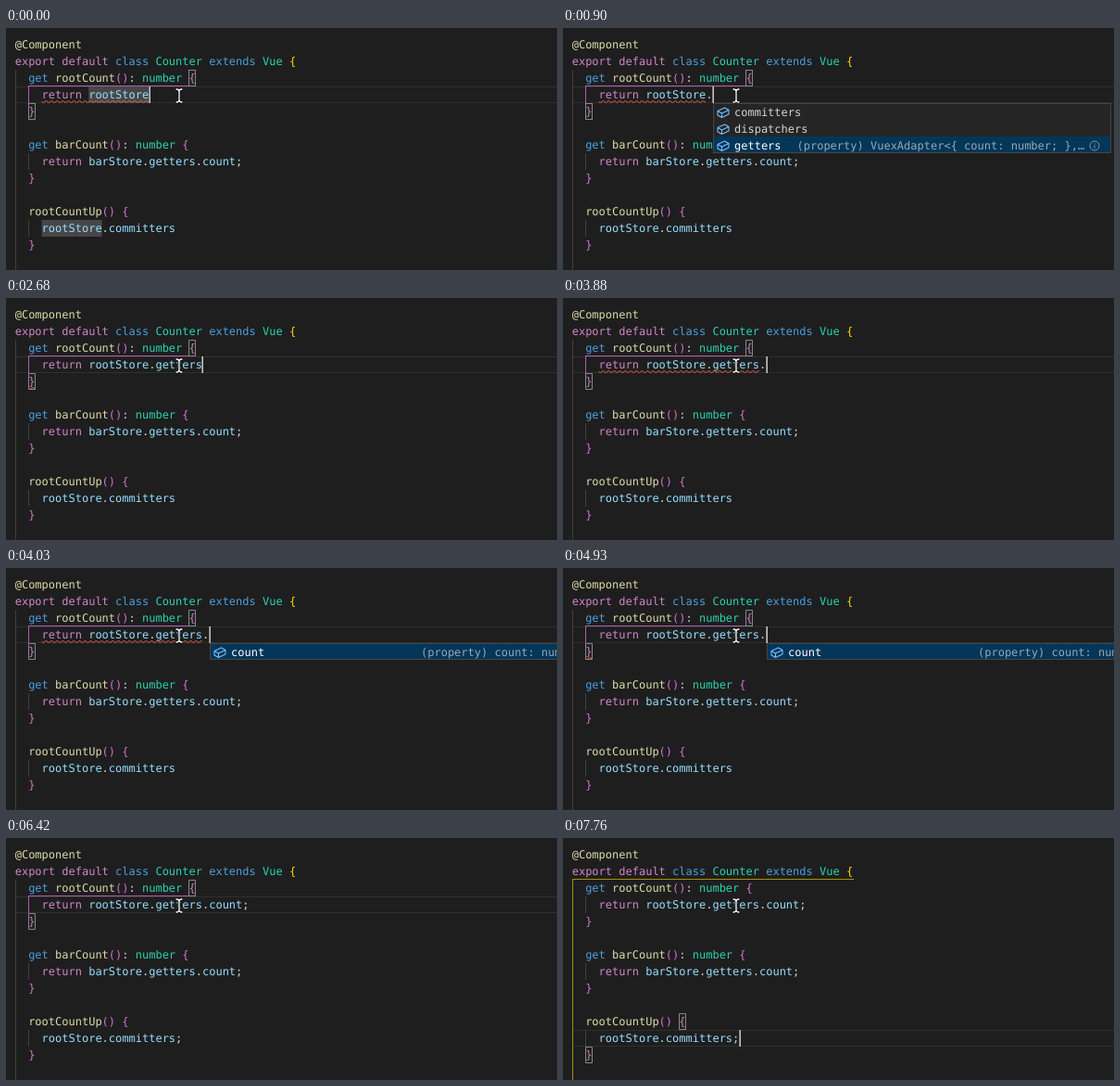
An HTML page with a canvas that plays this animation: 595 by 261 pixels, repeating every 8 s.

```html
<!DOCTYPE html>
<html lang="en">
<head>
<meta charset="utf-8">
<title>Editor completion</title>
<style>
  html, body { margin: 0; width: 100%; height: 100%; overflow: hidden; background: #1e1e1e; }
  canvas { display: block; width: 595px; height: 261px; }
</style>
</head>
<body>
<canvas id="stage" width="595" height="261"></canvas>
<script>
const LOOP = 8000;
const WIDTH = 595, HEIGHT = 261;
const LEFT = 9.7, CHAR = 7.224, TOP = 9, LINE = 18;
const FONT = '12px "DejaVu Sans Mono", monospace';

const C = {
  bg: '#1e1e1e', plain: '#d4d4d4', variable: '#96deff', func: '#dcdcaa',
  control: '#d385cb', keyword: '#4a9fe0', type: '#2ad3ae',
  gold: '#ffd700', pink: '#da70d6', guide: '#404040', error: '#f1604c',
  goldGuide: '#a88f0c', pinkGuide: '#b05cad'
};

const wordColor = {};
const assign = (color, words) => words.split(' ').forEach(w => wordColor[w] = color);
assign(C.control, 'export default return');
assign(C.keyword, 'class extends get');
assign(C.type, 'Counter Vue number');
assign(C.func, '@Component rootCount barCount rootCountUp');

const canvas = document.getElementById('stage');
const ctx = canvas.getContext('2d');

const colX = col => LEFT + col * CHAR;
const rowY = row => TOP + row * LINE;

function rect(x, y, w, h, color) {
  ctx.fillStyle = color;
  ctx.fillRect(x, y, w, h);
}

function text(str, x, y, color) {
  ctx.fillStyle = color;
  ctx.fillText(str, x, y);
}

// Value of the last [time, value] step reached
function at(steps, t) {
  let value = steps[0][1];
  for (const [time, v] of steps) if (t >= time) value = v;
  return value;
}

const typed = [
  [0, 'rootStore'], [900, 'rootStore.'], [2680, 'rootStore.getters'],
  [3880, 'rootStore.getters.'], [5080, 'rootStore.getters.count'],
  [5970, 'rootStore.getters.count;']
];

const caretOn = [
  [0, true], [150, false], [600, true], [1340, false], [1790, true],
  [2390, false], [2680, true], [3130, false], [3730, true], [4480, false],
  [4930, true], [5530, false], [5970, true], [6420, false], [7020, true]
];

const caretRow = [[0, 3], [7310, 4], [7610, 13], [7760, 11]];

// Error range as [row, first column, last column]
const errorRange = [
  [0, [3, 4, 20]], [1200, [4, 2, 3]], [2980, [3, 4, 28]],
  [4330, [4, 2, 3]], [5680, null]
];

// Matched brackets as [row, column]
const bracketPair = [
  [0, [[2, 26], [4, 2]]], [7610, []], [7760, [[10, 16], [12, 2]]]
];

const memberList = {
  x: 162, selected: 2, items: ['committers', 'dispatchers', 'getters'],
  detail: '(property) VuexAdapter<{ count: number; },…', detailX: 90.5
};
const countList = {
  x: 220, selected: 0, items: ['count'],
  detail: '(property) count: number', detailX: 228
};
const popup = [[0, null], [900, memberList], [2680, null], [4030, countList], [5080, null]];

function codeLines(t) {
  return [
    '@Component',
    'export default class Counter extends Vue {',
    '  get rootCount(): number {',
    '    return ' + at(typed, t),
    '  }',
    '',
    '  get barCount(): number {',
    '    return barStore.getters.count;',
    '  }',
    '',
    '  rootCountUp() {',
    '    rootStore.committers' + (t >= 5970 ? ';' : ''),
    '  }',
    ''
  ];
}

function drawLine(line, row) {
  for (const { 0: token, index } of line.matchAll(/@?\w+|\S/g)) {
    let color = C.plain;
    if (/\w/.test(token)) color = wordColor[token] || C.variable;
    else if (/[(){}]/.test(token)) color = row === 1 ? C.gold : C.pink;
    text(token, colX(index), rowY(row) + 13, color);
  }
}

function drawGuides(inMethod) {
  rect(10, 45, 1, HEIGHT - 45, C.guide);
  for (const row of [3, 7, 11]) rect(24, rowY(row), 1, LINE, C.guide);
  if (inMethod) {
    rect(24, 62, 181, 1, C.pinkGuide);
    rect(24, 62, 1, 19, C.pinkGuide);
  } else {
    rect(10, 44, 304, 1, C.goldGuide);
    rect(10, 44, 1, HEIGHT - 44, C.goldGuide);
  }
}

function drawSquiggle([row, from, to]) {
  const x = colX(from), end = colX(to), y = rowY(row) + 15;
  ctx.save();
  ctx.beginPath();
  ctx.rect(x, y, end - x, 3);
  ctx.clip();
  ctx.beginPath();
  for (let px = x - 1.25; px < end + 6; px += 6) {
    ctx.lineTo(px, y + 0.3);
    ctx.lineTo(px + 3, y + 2.7);
  }
  ctx.strokeStyle = C.error;
  ctx.lineWidth = 1;
  ctx.stroke();
  ctx.restore();
}

function drawBracketBox([row, col]) {
  const x = Math.floor(colX(col)), y = rowY(row);
  rect(x, y, 8, LINE, 'rgba(0,100,0,0.1)');
  ctx.strokeStyle = '#888';
  ctx.lineWidth = 1;
  ctx.strokeRect(x + 0.5, y + 0.5, 7, LINE - 1);
}

function drawCube(cx, cy) {
  ctx.strokeStyle = '#75beff';
  ctx.lineWidth = 1.1;
  ctx.lineJoin = 'round';
  ctx.beginPath();
  ctx.moveTo(cx - 6, cy - 1.5);
  ctx.lineTo(cx + 1.5, cy - 5);
  ctx.lineTo(cx + 6, cy - 2.5);
  ctx.lineTo(cx + 6, cy + 2);
  ctx.lineTo(cx - 1.5, cy + 5.5);
  ctx.lineTo(cx - 6, cy + 3);
  ctx.closePath();
  ctx.moveTo(cx - 6, cy - 1.5);
  ctx.lineTo(cx - 1.5, cy + 1);
  ctx.lineTo(cx + 6, cy - 2.5);
  ctx.moveTo(cx - 1.5, cy + 1);
  ctx.lineTo(cx - 1.5, cy + 5.5);
  ctx.stroke();
}

function drawInfo(cx, cy) {
  ctx.strokeStyle = '#7f95a6';
  ctx.lineWidth = 1;
  ctx.beginPath();
  ctx.arc(cx, cy, 5, 0, Math.PI * 2);
  ctx.stroke();
  rect(cx - 0.5, cy - 2.8, 1, 1.2, '#7f95a6');
  rect(cx - 0.5, cy - 0.8, 1, 3.6, '#7f95a6');
}

function drawPopup({ x, selected, items, detail, detailX }) {
  const y = rowY(4), w = 430, h = items.length * LINE;
  rect(x, y, w, h, '#252526');
  rect(x, y + selected * LINE, w, LINE, '#033659');
  ctx.strokeStyle = '#454545';
  ctx.lineWidth = 1;
  ctx.strokeRect(x + 0.5, y + 0.5, w - 1, h - 1);
  items.forEach((item, i) => {
    const top = y + i * LINE;
    drawCube(x + 11, top + 10);
    text(item, x + 23, top + 14, i === selected ? '#ffffff' : C.plain);
  });
  const top = y + selected * LINE;
  text(detail, x + detailX, top + 14, '#94a9b8');
  drawInfo(x + 412, top + 10);
}

function drawPointer() {
  const x = 187, y = 66, bottom = 80;
  ctx.beginPath();
  ctx.moveTo(x - 3, y);
  ctx.quadraticCurveTo(x, y, x, y + 2.5);
  ctx.quadraticCurveTo(x, y, x + 3, y);
  ctx.moveTo(x, y + 2);
  ctx.lineTo(x, bottom - 2);
  ctx.moveTo(x - 3, bottom);
  ctx.quadraticCurveTo(x, bottom, x, bottom - 2.5);
  ctx.quadraticCurveTo(x, bottom, x + 3, bottom);
  ctx.lineCap = 'round';
  ctx.strokeStyle = '#111';
  ctx.lineWidth = 3;
  ctx.stroke();
  ctx.strokeStyle = '#fff';
  ctx.lineWidth = 1.3;
  ctx.stroke();
  ctx.lineCap = 'butt';
}

function draw(t) {
  const lines = codeLines(t);
  const row = at(caretRow, t);
  const error = at(errorRange, t);
  const list = at(popup, t);

  ctx.font = FONT;
  ctx.textRendering = 'geometricPrecision';
  rect(0, 0, WIDTH, HEIGHT, C.bg);

  rect(10, rowY(row), WIDTH, 1, '#303030');
  rect(10, rowY(row) + LINE - 1, WIDTH, 1, '#303030');
  if (t < 900) {
    rect(colX(11), rowY(3), 9 * CHAR, LINE, '#474747');
    rect(colX(4), rowY(11), 9 * CHAR, LINE, '#474747');
  }
  drawGuides(t < 7310);
  at(bracketPair, t).forEach(drawBracketBox);
  lines.forEach(drawLine);
  if (error) drawSquiggle(error);
  if (at(caretOn, t)) {
    rect(Math.floor(colX(lines[row].length)) + 0.4, rowY(row), 1.6, LINE, '#c4c5c3');
  }
  if (list) drawPopup(list);
  drawPointer();
}

const start = performance.now();
function frame() {
  draw((performance.now() - start) % LOOP);
  requestAnimationFrame(frame);
}
frame();
</script>
</body>
</html>
```
